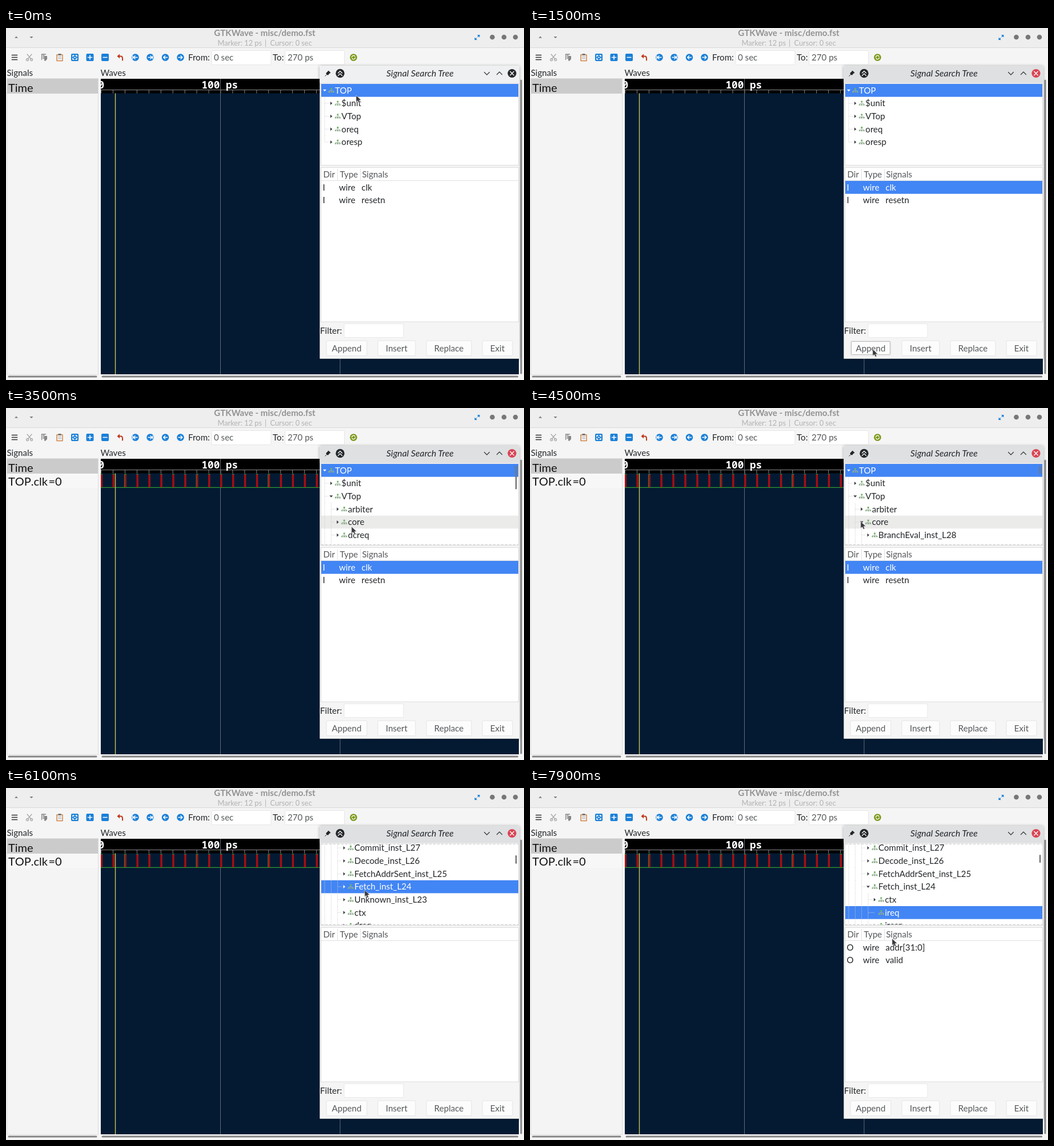
Write an HTML page that moves like this. It is 907 px wide and 617 px high and loops after 8 s.

```html
<!DOCTYPE html>
<html lang="en">
<head>
<meta charset="utf-8">
<title>Waveform viewer</title>
<style>
html, body { margin: 0; width: 100%; height: 100%; overflow: hidden; background: #f5f5f5; }
svg { display: block; }
text { font: 15.1px Lato, Carlito, sans-serif; fill: #232629; white-space: pre; }
.big { font-size: 20px; fill: #111; font-kerning: none; }
.title { font-weight: 700; fill: #929292; }
.sub { font-size: 12.8px; fill: #b2b2b2; }
.dim { fill: #55585b; }
.head { font-style: italic; font-size: 15.8px; }
.sel { fill: #fff; }
.mono { font: 600 17.7px "Noto Sans Mono", "DejaVu Sans Mono", monospace; fill: #fff; }
.mid { text-anchor: middle; }
.line { fill: none; stroke-linecap: round; stroke-linejoin: round; }
</style>
</head>
<body>
<svg width="907" height="617" viewBox="0 0 907 617">
  <defs>
    <clipPath id="waveClip"><rect x="166" y="89" width="732" height="518"/></clipPath>
    <clipPath id="treeClip"><rect x="552" y="97.5" width="345" height="142.5"/></clipPath>
    <filter id="shadow" x="-10%" y="-10%" width="120%" height="120%">
      <feDropShadow dx="0" dy="1" stdDeviation="2.5" flood-color="#000" flood-opacity=".38"/>
    </filter>
    <g id="node">
      <path d="M0-2V1M-3.5 2V.5H3.5V2" fill="none" stroke="#a9b5ab" stroke-width=".8"/>
      <path d="M-1.4-4.2h2.8v2.8h-2.8z" fill="#6fb35f"/>
      <path d="M-5 1.4h2.6v2.4h-2.6zM2.4 1.4H5v2.4H2.4z" fill="#83b878"/>
      <path d="M-1.3 1.4h2.6v2.4h-2.6z" fill="#8b9c92"/>
    </g>
  </defs>

  <rect width="907" height="617" fill="#f5f5f5"/>
  <rect width="907" height="34" fill="#eeeeee"/>
  <path d="M0 34.5H907" stroke="#d9d9d9"/>
  <path d="M15 17.5L18 14.5L21 17.5ZM41.500 15L44.500 18L47.500 15Z" fill="#777"/>
  <text class="title mid" x="453" y="14">GTKWave - misc/demo.fst</text>
  <text class="sub" x="370.500" y="30.500">Marker: 12 ps</text>
  <text class="sub" x="453" y="30.500">|</text>
  <text class="sub" x="462.500" y="30.500">Cursor: 0 sec</text>
  <path d="M825 12h4.500v4.500zM820.500 16.500v4.500h4.500z" fill="#1a80d8"/>
  <path d="M822 19.500L828 13.500" stroke="#1a80d8" stroke-width="1.300" stroke-dasharray="3 2.400"/>
  <g fill="#777"><circle cx="851.500" cy="16" r="4.300"/><circle cx="872" cy="16" r="4.300"/><circle cx="892" cy="16" r="4.300"/></g>

  <g id="toolbar"></g>
  <g fill="#fff" stroke="#e6e6e6">
    <rect x="360" y="39.500" width="104" height="25" rx="2"/>
    <rect x="488.500" y="39.500" width="104" height="25" rx="2"/>
  </g>
  <text x="319" y="57">From:</text><text class="dim" x="364" y="57">0 sec</text>
  <text x="467" y="57">To:</text><text class="dim" x="493" y="57">270 ps</text>

  <text x="1.500" y="84">Signals</text><text x="165.500" y="84">Waves</text>
  <rect x="1.500" y="88.500" width="160" height="519" fill="#f4f4f4" stroke="#dedede"/>
  <rect x="2" y="89" width="159" height="26" fill="#cbcbcb"/>
  <text class="big" x="4" y="112">Time</text>

  <g clip-path="url(#waveClip)">
    <rect x="166" y="89" width="732" height="518" fill="#041a33"/>
    <rect x="166" y="89" width="732" height="25.500" fill="#000"/>
    <g id="grid"></g>
    <text class="mono" x="161.500" y="106">0</text>
    <text class="mono" x="342.500" y="106">100 ps</text>
  </g>
  <g id="clock">
    <rect x="2" y="115" width="159" height="25" fill="#f7f7f7"/>
    <text class="big" x="4" y="136">TOP.clk</text><text class="big" x="74.500" y="136">=0</text>
    <g id="pulses" clip-path="url(#waveClip)"></g>
  </g>
  <path d="M191.500 114.500V607" stroke="#c9c653" stroke-width="1.400"/>
  <path d="M5 611H158M169 611H895.500M902 92V605" class="line" stroke="#858585" stroke-width="3"/>

  <g filter="url(#shadow)"><rect x="549.400" y="66" width="349.200" height="513.700" fill="#f5f5f5"/></g>
  <rect id="bar" x="549.400" y="66" width="349.200" height="30"/>
  <text class="head mid" x="725" y="85">Signal Search Tree</text>
  <path d="M564.500 75L568 78.500L566.500 79L563.500 82.500L560.500 79.500L563.500 76.500ZM562 81L558.500 84.500" fill="#232629" stroke="#232629"/>
  <circle cx="585" cy="79.500" r="7.700" fill="#232629"/>
  <path class="line" d="M581.500 79L585 75.500L588.500 79M581.500 83.500L585 80L588.500 83.500" stroke="#fff" stroke-width="1.200"/>
  <path class="line" d="M837.500 77.500L842 82L846.500 77.500M859.500 81.500L864 77L868.500 81.500" stroke="#333639" stroke-width="1.200"/>
  <circle id="close" cx="886" cy="79.500" r="7.600"/>
  <path class="line" d="M882.800 76.300L889.200 82.700M889.200 76.300L882.800 82.700" stroke="#fff" stroke-width="1.300"/>

  <rect x="551.500" y="97" width="346" height="143.500" fill="#fff" stroke="#dcdcdc"/>
  <g id="tree" clip-path="url(#treeClip)"></g>
  <rect x="551.500" y="244.500" width="346" height="270.500" fill="#fff" stroke="#dcdcdc"/>
  <path d="M552 267.500H897M580.500 247V267M620.500 247V267" stroke="#e1e1e1"/>
  <text class="dim" x="555.500" y="262">Dir</text><text class="dim" x="584.500" y="262">Type</text><text class="dim" x="623.500" y="262">Signals</text>
  <g id="list"></g>

  <text x="550" y="536">Filter:</text>
  <rect x="592" y="518.500" width="104" height="24" rx="2" fill="#fff" stroke="#e8e8e8"/>
  <g id="buttons"></g>
  <rect id="focus" x="562.500" y="549.500" width="68" height="23" rx="1.500" fill="none" stroke="#b5b5b5"/>
  <path id="cursor" d="M0 1V12.500L2.800 10.400L4.900 14.500L7 13.400L5.100 9.700L8.700 9.200Z" fill="#38393d" stroke="#e8e8e8" stroke-width=".6"/>
</svg>
<script>
const $ = id => document.getElementById(id);
const clamp = (v, lo, hi) => Math.min(hi, Math.max(lo, v));
const range = (n, f) => Array.from({ length: n }, (_, i) => f(i)).join("");
const show = (id, on) => $(id).setAttribute("visibility", on ? "visible" : "hidden");
const label = (x, y, s, cls = "") => `<text x="${x}" y="${y}" class="${cls}">${s}</text>`;
const box = (x, y, w, h, fill) => `<rect x="${x}" y="${y}" width="${w}" height="${h}" fill="${fill}"/>`;

const BLUE = "#4285f4", HOVER = "#ebebea", ICON = "#1a80d8";
const LOOP = 8000, STEP = 100;
const ROW = 22.66, TREE_Y = 98, TREE_H = 142, INDENT = 11.35, NOTCH = 23.27;
const LIST_Y = 268, DECADE = 20.95;

// Pointer path: time, x, y
const path = [
  [100, 613, 117], [700, 639, 286], [900, 638, 288], [1500, 600, 562],
  [1700, 600, 562], [2400, 569.5, 172], [2500, 568, 152], [2700, 568, 152],
  [3500, 605, 207], [4300, 579, 198], [4500, 579, 198], [5100, 633, 190],
  [5600, 630, 178], [5900, 630, 177], [6100, 628, 178], [6700, 590, 171],
  [6900, 591, 173], [7100, 608, 211], [7200, 608, 211], [7500, 632, 212],
  [7700, 632, 217], [7900, 634, 263]
];

function pointer(t) {
  const i = path.findIndex(p => p[0] >= t);
  if (i < 0) return path[path.length - 1].slice(1);
  if (i === 0) return path[0].slice(1);
  const [t0, x0, y0] = path[i - 1], [t1, x1, y1] = path[i];
  const k = (t - t0) / (t1 - t0), e = k * k * (3 - 2 * k);
  return [x0 + (x1 - x0) * e, y0 + (y1 - y0) * e];
}

function treeRows(t) {
  const rows = [];
  const add = (depth, names) => names.split(" ").forEach(name => rows.push({ name, depth }));
  const open = () => { rows[rows.length - 1].open = true; };
  add(0, "TOP"); open();
  add(1, "$unit VTop");
  if (t >= 2700) {
    open();
    add(2, "arbiter core");
    if (t >= 4500) {
      open();
      add(3, "BranchEval_inst_L28 Branch_inst_L29 Commit_inst_L27 Decode_inst_L26 FetchAddrSent_inst_L25 Fetch_inst_L24");
      if (t >= 6900) {
        open();
        add(4, "ctx ireq iresp");
        rows[rows.length - 2].leaf = true;
      }
      add(3, "Unknown_inst_L23 ctx dreq");
    }
    add(2, "dcreq dcresp");
  } else {
    add(1, "oreq oresp");
  }
  return rows;
}

function drawRow(r, y, picked, hovered) {
  const x = 558 + r.depth * INDENT, c = y + ROW / 2;
  let s = picked || hovered ? box(552, y, 345, ROW, picked ? BLUE : HOVER) : "";
  let guides = "";
  for (let d = 0; d < r.depth; d++) {
    const gx = 558 + d * INDENT, end = r.name === "oresp" ? c : y + ROW;
    guides += `M${gx} ${y}V${end}`;
  }
  if (r.depth) guides += `M${x - INDENT} ${c}H${r.leaf ? x : x - 4}`;
  s += `<path d="${guides}" fill="none" stroke="#cfcfcf" stroke-width=".8" stroke-dasharray="1.4 1"/>`;
  if (!r.leaf) {
    const tri = r.open ? "M-3-1.500H3L0 2Z" : "M-1.500-3V3L2 0Z";
    s += `<path d="${tri}" transform="translate(${x} ${c})" fill="${picked ? "#fff" : "#3c3f42"}"/>`;
  }
  s += `<use href="#node" x="${x + 11.5}" y="${c}"/>`;
  return s + label(x + 18, c + 5.3, r.name, picked ? "sel" : "");
}

function drawTree(t, my) {
  const scroll = NOTCH * clamp((t - 4800) / STEP, 0, 7);
  const picked = t < 5900 ? "TOP" : t < 7700 ? "Fetch_inst_L24" : "ireq";
  const inside = my >= TREE_Y && my < 240;
  let s = "";
  treeRows(t).forEach((r, i) => {
    const y = TREE_Y + i * ROW - scroll;
    s += drawRow(r, y, r.name === picked, inside && my >= y && my < y + ROW);
  });
  if (t >= 2700) {
    const total = (t < 4500 ? 21 : t < 6900 ? 59 : 62) * ROW;
    const fade = t < 4500 ? clamp((4300 - t) / 300, 0, 1) : 1;
    const y = 101 + scroll / total * 139, h = TREE_H / total * 139;
    s += `<rect x="891.800" y="${y}" width="2.600" height="${h}" rx="1.300" fill="#777" opacity="${fade}"/>`;
    const edges = (scroll ? "M552 98.500H897" : "") + "M552 239.500H897";
    s += `<path d="${edges}" stroke="#d2d2d2" stroke-dasharray="4 3"/>`;
  }
  $("tree").innerHTML = s;
}

function drawList(t, my) {
  const names = t < 5900 ? ["clk", "resetn"] : t < 7700 ? [] : ["addr[31:0]", "valid"];
  const dir = t < 5900 ? "I" : "O";
  $("list").innerHTML = names.map((name, i) => {
    const y = LIST_Y + i * ROW, base = y + 16.8;
    const picked = i === 0 && t >= 900 && t < 5900;
    const hovered = my >= y && my < y + ROW;
    const cls = picked ? "sel" : "";
    return (picked || hovered ? box(552, y, 345, ROW, picked ? BLUE : HOVER) : "")
      + label(554.5, base, dir, cls) + label(583, base, "wire", cls) + label(622.5, base, name, cls);
  }).join("");
}

function render(t) {
  const [mx, my] = pointer(t);
  const active = t >= 900;
  $("bar").setAttribute("fill", active ? "#dee0e2" : "#eff0f1");
  $("close").setAttribute("fill", active ? "#da4453" : "#232629");
  show("clock", t >= 1700);
  show("focus", t >= 1400 && t < 2700);
  drawTree(t, my);
  drawList(t, my);
  $("cursor").setAttribute("transform", `translate(${mx} ${my})`);
}

function drawToolbar() {
  const at = (x, s) => `<g transform="translate(${x} 51.500)">${s}</g>`;
  const line = (d, color, w = 1.3) => `<path class="line" d="${d}" stroke="${color}" stroke-width="${w}"/>`;
  const tile = d => `<rect x="-6.500" y="-6.500" width="13" height="13" rx="2" fill="${ICON}"/>` + line(d, "#fff", 1.6);
  const disc = (d, color = ICON) => `<circle r="6.300" fill="${color}"/>` + line(d, "#fff", 1.4);
  const left = "M3.500 0H-3M-.500-2.800L-3.300 0L-.500 2.800", right = "M-3.500 0H3M.500-2.800L3.300 0L.500 2.800";
  $("toolbar").innerHTML =
    at(15, line("M-4.500-4H4.500M-4.500 0H4.500M-4.500 4H4.500", "#333", 1.7)) +
    at(41, line("M-4-5.500L3 3M4-5.500L-3 3", "#aaa") + `<g fill="none" stroke="#aaa" stroke-width="1.300"><circle cx="-3.500" cy="4" r="2"/><circle cx="3.500" cy="4" r="2"/></g>`) +
    at(67, line("M-4.500 4V-5.500H2.500M-2.500-3.500H0M-2.500-1H0M-2.500 1.500H0", "#888") + `<path d="M0-2.500H5V3L2.500 6H0Z" fill="#888"/>`) +
    at(94, line("M-5-4.500H5V6H-5Z", "#d28445", 1.5) + box(-2.5, -6.5, 5, 3, "#777") + line("M-2.500-1H2.500M-2.500 2H2.500", "#bbb")) +
    at(120.5, tile("M-3.500-1.500V-3.500H-1.500M1.500-3.500H3.500V-1.500M3.500 1.500V3.500H1.500M-1.500 3.500H-3.500V1.500M-.800 0H.800")) +
    at(147, tile("M-3.500 0H3.500M0-3.500V3.500")) +
    at(173.5, tile("M-3.500 0H3.500")) +
    at(200, line("M-3.500-2H1Q4-2 4 2V5", "#c0391b", 2) + `<path d="M-5.500-2L-1-6V2Z" fill="#c0391b"/>`) +
    at(226.5, disc(left + "M-4.500-2.500V2.500")) + at(252.5, disc(right + "M4.500-2.500V2.500")) +
    at(279, disc(left)) + at(305.5, disc(right)) +
    at(608.5, disc("M-3-.500A3 3 0 0 1 2.500-1.800M3 .500A3 3 0 0 1-2.500 1.800", "#7d9a1b"));
}

function drawStatic() {
  drawToolbar();
  $("grid").innerHTML =
    `<path d="M166 108.500H898${range(35, i => `M${166.500 + i * DECADE} 108.500V114.500`)}" stroke="#8a8a8a" fill="none"/>` +
    `<path d="M375.500 89V607M585 89V607" stroke="#636b76"/>`;
  $("pulses").innerHTML = `<path d="M166 139.300H898" stroke="#2f9a2f" stroke-width="1.200"/>` +
    range(27, i => {
      const x = 166 + i * DECADE;
      const edge = i % 6 === 2 ? box(x - 1, 116, 1, 23, "#2f8a2f") : "";
      return box(x - .5, 116, 3.5, 23, "#a80d10") + box(x - .5, 115.5, 3.5, 1, "#2f9a2f") + edge;
    });
  const buttons = [["Append", 561, 71], ["Insert", 651, 66], ["Replace", 736, 79], ["Exit", 834, 53]];
  $("buttons").innerHTML = buttons.map(([name, x, w]) =>
    `<rect x="${x}" y="548" width="${w}" height="26.500" rx="2" fill="#fcfcfc" stroke="#e4e4e4"/>` +
    label(x + w / 2, 567, name, "dim mid")).join("");
}

drawStatic();
const start = performance.now();
let last = -1;
function tick() {
  const t = Math.floor((performance.now() - start) % LOOP / STEP) * STEP;
  if (t !== last) render(last = t);
  requestAnimationFrame(tick);
}
tick();
</script>
</body>
</html>
```
